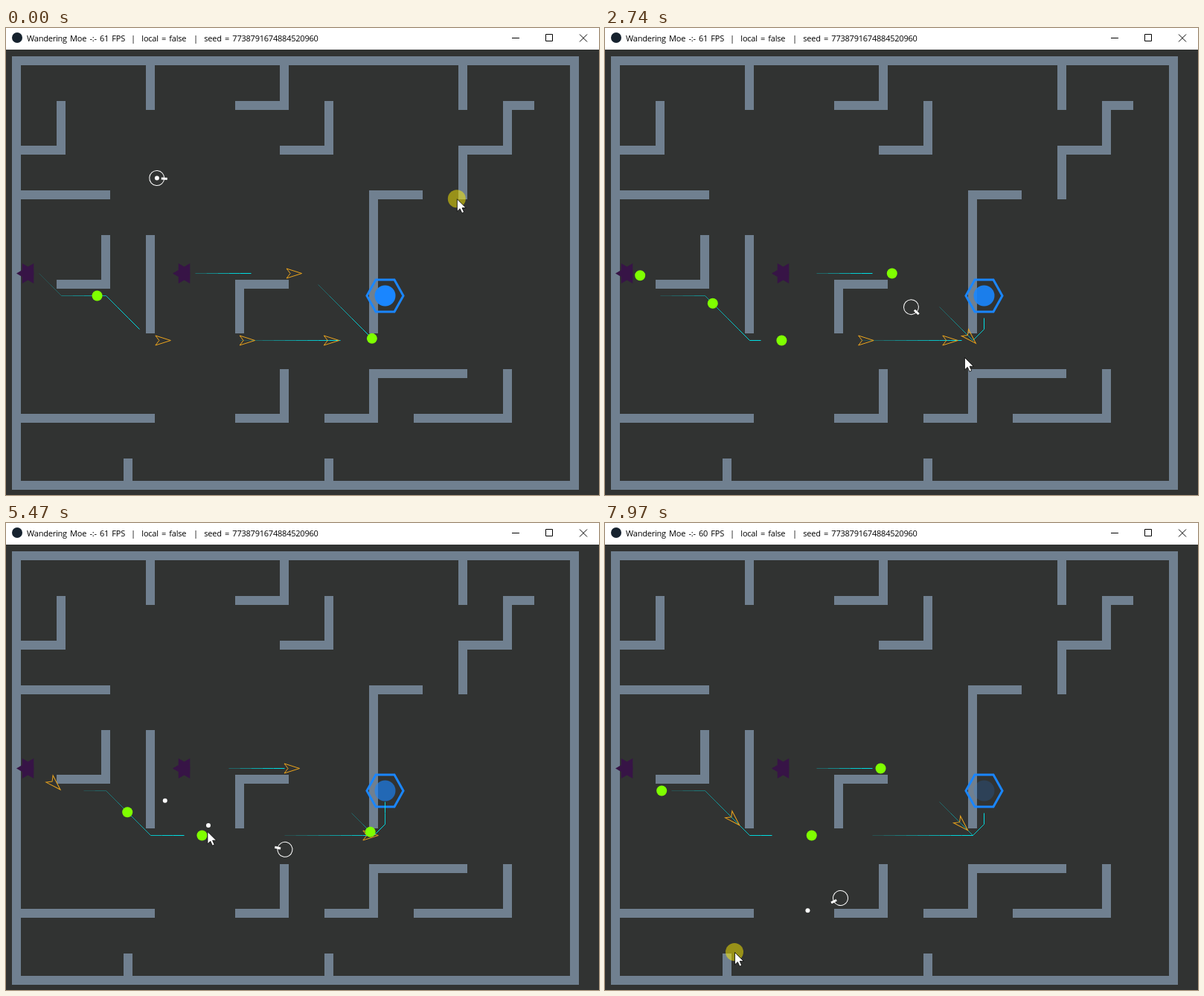
These frames come from a looping animation (797 px wide and 627 px high, 8000 ms). An HTML page:

```html
<!DOCTYPE html>
<html lang="en">
<head>
<meta charset="utf-8">
<title>Maze shooter</title>
<style>
  html, body { margin: 0; width: 100%; height: 100%; overflow: hidden; background: #313332; }
  svg { display: block; width: 797px; height: 627px; }
  text { font: 11px "Open Sans", "Noto Sans", sans-serif; letter-spacing: -.22px; word-spacing: 1.6px; fill: #000; white-space: pre; }
</style>
</head>
<body>
<svg viewBox="0 0 797 627">
  <rect width="797" height="627" fill="#313332"/>
  <rect width="797" height="29" fill="#fff"/>
  <circle cx="15" cy="13" r="7" fill="#16222e"/>
  <text x="28" y="18" id="title"></text>
  <text x="168" y="18">|  local = false</text>
  <text x="252" y="18">|  seed = 7738791674884520960</text>
  <path d="M680 13.5H690M725.5 8.5h9v9h-9zM771 8.5l10 10m0-10l-10 10" fill="none" stroke="#000"/>
  <path fill="none" stroke="#708090" stroke-width="12" stroke-linecap="square" d="M14 44H764V614H14Z
    M194 44V104M374 44V104H314M434 104V164H374M614 44V104M704 104H674V164H614V224M74 104V164H14
    M14 224H134M134 284V344H74M194 284V404M374 344H314V404M554 224H494V404M614 464H494V524H434
    M374 464V524H314M674 464V524H554M14 524H194M164 584V614M434 584V614"/>
  <g transform="translate(509.5 359.5)">
    <circle id="core" r="14" fill="#1a86ff"/>
    <path d="M-24.500 0L-12.500 -21.500H12.500L24.500 0L12.500 21.500H-12.500Z" fill="none" stroke="#1a86ff" stroke-width="3"/>
  </g>
  <g id="scene" transform="translate(.5 .5)"></g>
  <g id="mouse">
    <circle id="press" r="12" fill="#fff000" opacity=".5"/>
    <path d="M.5 .5V17L4.300 13.400L7 19.300L9.800 18L7.200 12.300H12.300Z" fill="#fff" stroke="#000" stroke-width=".8"/>
  </g>
</svg>
<script>
const LOOP = 8, SPEED = 51, GOAL_RADIUS = 18;
const BULLET = { speed: 400, life: .5, every: .18, fade: .2 };
const $ = id => document.getElementById(id);

// One node per 15 px grid step, plus the distance walked up to it.
function makeRoute(corners) {
  const nodes = [corners[0]], dist = [0];
  corners.slice(1).forEach(([x, y], i) => {
    const [px, py] = corners[i];
    const n = Math.max(Math.abs(x - px), Math.abs(y - py)) / 15;
    const step = Math.hypot(x - px, y - py) / n;
    for (let k = 1; k <= n; k++) {
      nodes.push([px + (x - px) * k / n, py + (y - py) * k / n]);
      dist.push(dist[dist.length - 1] + step);
    }
  });
  return { nodes, dist, length: dist[dist.length - 1] };
}

// Each lane spawns its kinds in order (d = dart, b = blob); lead is the first one's distance at t = 0.
const end = [[494, 419], [509, 404], [509, 359]];
const lanes = [
  { route: makeRoute([[29, 329], [44, 329], [74, 359], [134, 359], [194, 419], ...end]),
    kinds: "dddbbbdb", lead: 445, gap: 113.2, start: 3, deaths: { 1: 2.95, 3: 5.3, 4: 6.6 } },
  { route: makeRoute([[239, 329], [404, 329], ...end]),
    kinds: "bdbdb", lead: 288.5, gap: 141, start: 8, deaths: { 0: 3.2 } }
];
lanes[1].deaths = { 1: 3.2 };

// time, player x y, mouse x y
const keys = [
  [0, 202, 201, 606, 229],
  [1.12, 479, 220, 418, 482],
  [2.05, 437, 314, 387, 507],
  [2.9, 405, 388, 505, 427],
  [3.12, 400, 392, 505, 427],
  [3.43, 384, 449, 370, 481],
  [4.68, 392, 458, 303, 402],
  [6.21, 358, 419, 240, 425],
  [7.97, 316, 503, 174, 576]
];
const presses = [[0, .1], [.86, 1.1], [2.92, 3.2], [5, 5.25], [6.195, 6.45], [7.84, 8]];
const shots = presses.flatMap(([a, b]) =>
  Array.from({ length: Math.ceil((b - a) / BULLET.every) }, (_, i) => a + i * BULLET.every));

function pose(t) {
  let i = 0;
  while (i < keys.length - 2 && t >= keys[i + 1][0]) i++;
  const a = keys[i], b = keys[i + 1], u = Math.min(1, (t - a[0]) / (b[0] - a[0]));
  const [, x, y, mx, my] = a.map((v, j) => v + (b[j] - v) * u);
  return { x, y, mx, my, angle: Math.atan2(my - y, mx - x) };
}

function along({ nodes, dist }, d) {
  let i = 1;
  while (i < nodes.length - 1 && d > dist[i]) i++;
  const [ax, ay] = nodes[i - 1], [bx, by] = nodes[i];
  const u = (d - dist[i - 1]) / (dist[i] - dist[i - 1]);
  return { x: ax + (bx - ax) * u, y: ay + (by - ay) * u, angle: Math.atan2(by - ay, bx - ax) };
}

const place = (p, shape) =>
  `<g transform="translate(${p.x} ${p.y}) rotate(${p.angle * 180 / Math.PI})">${shape}</g>`;
const shapes = {
  d: '<path d="M10.500 0L-10 -6.500L-5 0L-10 6.500Z" fill="none" stroke="#eda51c"/>',
  b: '<circle r="7" fill="#7fff00"/>',
  ship: '<circle r="10" fill="none" stroke="#fff"/><path d="M6 0H14" stroke="#fff" stroke-width="3"/>'
};

function star({ route }) {
  const [x, y] = route.nodes[0];
  const points = Array.from({ length: 12 }, (_, i) => {
    const r = i === 0 ? 8 : i % 2 ? 9 : 15.5, a = i * Math.PI / 6;
    return [x + r * Math.cos(a), y + r * Math.sin(a)];
  });
  return `<polygon points="${points.join(" ")}" fill="#371446"/>`;
}

// Two fading pulses share each route, each a quarter of it long.
function pulses({ route: { nodes } }, t) {
  const period = nodes.length / 2, size = Math.floor(period / 2);
  const phase = (.555 + .776 * t) % 1;
  let out = "";
  for (let head = Math.round(phase * period); head < nodes.length + size; head += period)
    for (let i = 1; i <= size; i++) {
      const n = head - size + i;
      if (n < 1 || n >= nodes.length) continue;
      out += `<path d="M${nodes[n - 1]}L${nodes[n]}" stroke="#00dfe4" opacity="${Math.min(1, (i + .5) / size)}"/>`;
    }
  return out;
}

function enemies({ route, kinds, lead, gap, start, deaths }, t) {
  return [...kinds].map((kind, i) => {
    const d = lead - gap * i + SPEED * t;
    const gone = d < start || d > route.length - GOAL_RADIUS || t > deaths[i];
    return gone ? "" : place(along(route, d), shapes[kind]);
  }).join("");
}

function shot(start, t) {
  const age = t - start;
  if (age <= 0 || age > BULLET.life + BULLET.fade) return "";
  const { x, y, angle } = pose(start), d = BULLET.speed * Math.min(age, BULLET.life);
  const burst = Math.max(0, age - BULLET.life) / BULLET.fade;
  return `<circle cx="${x + d * Math.cos(angle)}" cy="${y + d * Math.sin(angle)}" r="${3 + 10 * burst}" fill="#fff" opacity="${1 - burst}"/>`;
}

function draw(t) {
  const p = pose(t);
  const fps = Math.sin(2 * Math.PI * (t + .7) / 2.9) > 0 ? 61 : 60;
  $("title").textContent = `Wandering Moe -:- ${fps} FPS`;
  $("core").setAttribute("opacity", .55 + .45 * Math.cos(2 * Math.PI * t / 3.07));
  $("scene").innerHTML = [
    ...lanes.map(star),
    ...lanes.map(l => pulses(l, t)),
    ...lanes.map(l => enemies(l, t)),
    place(p, shapes.ship),
    ...shots.map(s => shot(s, t))
  ].join("");
  $("mouse").setAttribute("transform", `translate(${p.mx} ${p.my})`);
  $("press").setAttribute("visibility", presses.some(([a, b]) => t >= a && t < b) ? "visible" : "hidden");
}

const begin = performance.now();
function tick() {
  draw((performance.now() - begin) / 1000 % LOOP);
  requestAnimationFrame(tick);
}
tick();
</script>
</body>
</html>
```
